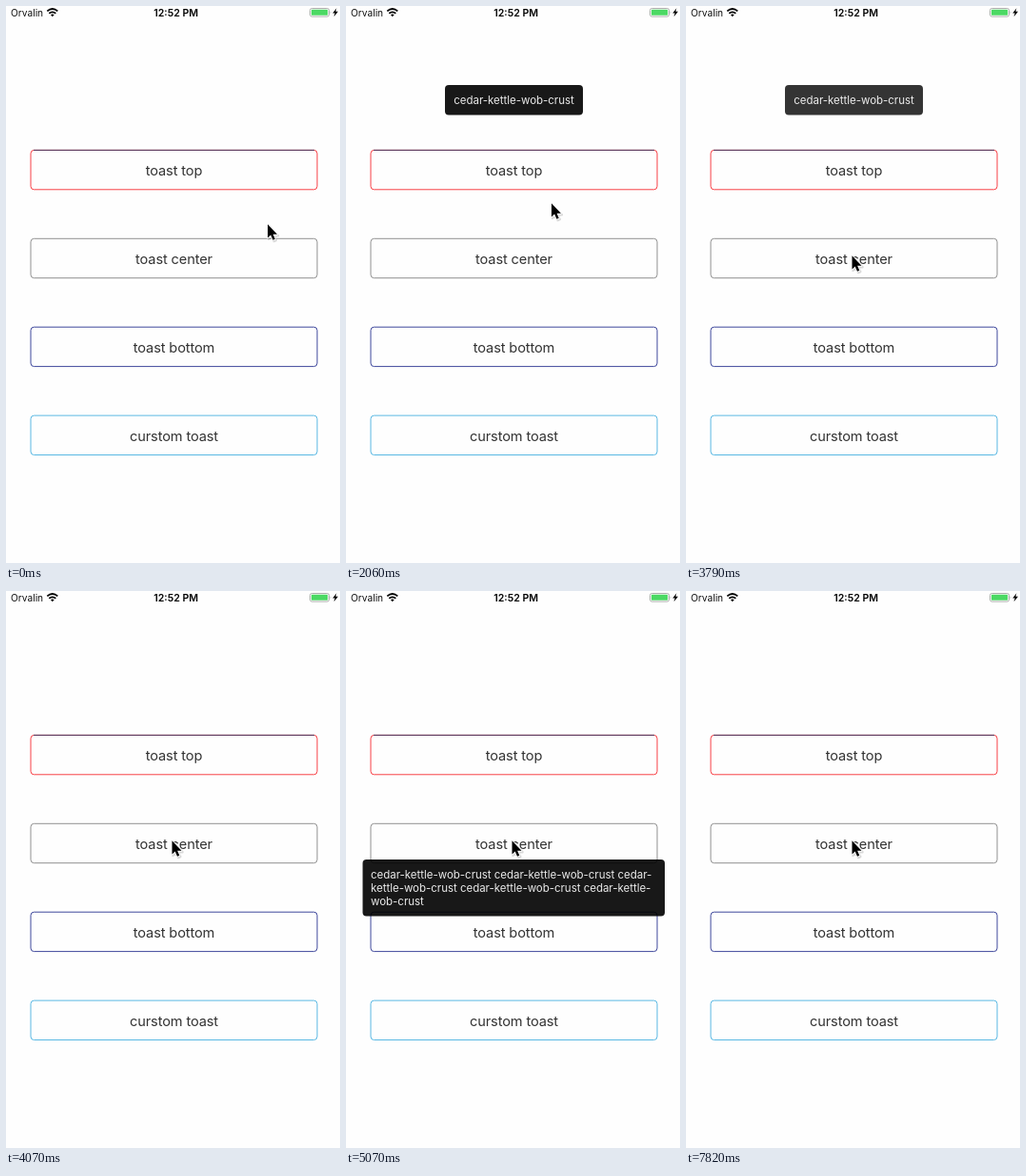
Recreate the animation shown at these times as an HTML page. Size 351 by 585 pixels, loop 8 s.

```html
<!DOCTYPE html>
<html lang="en">
<head>
<meta charset="utf-8">
<title>Toast demo</title>
<style>
  html, body { margin: 0; width: 100%; height: 100%; overflow: hidden; background: #fefefe; }
  svg { display: block; width: 100%; height: 100%; }
  text { font-family: Inter, Roboto, "Liberation Sans", sans-serif; }
  .label { font-size: 14.6px; letter-spacing: -0.13px; fill: #333; text-anchor: middle; }
  .toast text { font-size: 11.5px; letter-spacing: -0.02px; fill: #e8e8e8; }
  .status { font-size: 10.2px; fill: #111; }
  .clock { font-size: 10.6px; font-weight: 600; fill: #000; text-anchor: middle; }
</style>
</head>
<body>
<svg viewBox="0 0 351 585">
  <rect width="351" height="585" fill="#fefefe"/>

  <text class="status" x="5" y="10.7">Orvalin</text>
  <g fill="none" stroke="#000" stroke-width="1.8">
    <path d="M43.3 5.4Q48.8 .7 54.3 5.4"/>
    <path d="M45.3 7.8Q48.8 4.9 52.3 7.8"/>
  </g>
  <path d="M47 9.2Q48.8 7.8 50.6 9.2L48.8 11.2Z"/>
  <text class="clock" x="178.7" y="10.8">12:52 PM</text>
  <rect x="319.5" y="2.5" width="20" height="8.6" rx="2" fill="none" stroke="#a5a5a5" stroke-width=".9"/>
  <rect x="320.9" y="3.8" width="17.2" height="6" rx=".9" fill="#4cd964"/>
  <path d="M340.7 5.2Q342.1 6.8 340.7 8.4Z" fill="#a5a5a5"/>
  <path d="M347.4 2.2L343.3 7.4H345.7L344.6 11.2L349 5.8H346.4Z"/>

  <g id="buttons"></g>

  <g class="toast" id="topToast">
    <rect x="104" y="83" width="145" height="31.5" rx="4"/>
  </g>
  <g class="toast" id="longToast">
    <rect x="17.5" y="282" width="317.5" height="59.5" rx="4"/>
  </g>

  <g id="cursor">
    <path d="M0 0V14.2L3.2 11.3L5.5 16.4L7.8 15.4L5.6 10.5H10Z" transform="translate(1 1.4)"
          fill="#000" stroke="#000" stroke-width="2.4" stroke-linejoin="round" opacity=".14"/>
    <path d="M0 0V14.2L3.2 11.3L5.5 16.4L7.8 15.4L5.6 10.5H10Z"
          fill="#000" stroke="#fff" stroke-width="1.8" stroke-linejoin="round" paint-order="stroke"/>
  </g>
</svg>

<script>
const LOOP = 8000;
const byId = id => document.getElementById(id);

function add(parent, tag, attrs, content = "") {
  const node = document.createElementNS("http://www.w3.org/2000/svg", tag);
  for (const key in attrs) node.setAttribute(key, attrs[key]);
  node.textContent = content;
  parent.append(node);
  return node;
}

const buttons = [
  ["toast top", "#f8353a"],
  ["toast center", "#8a8a8a"],
  ["toast bottom", "#333c96"],
  ["curstom toast", "#4fb4e2"]
].map(([name, color], i) => {
  const y = 151.4 + i * 92.9;
  const group = add(byId("buttons"), "g", {});
  const box = { x: 26, y, width: 301, height: 41.4, rx: 3.5 };
  add(group, "rect", { ...box, fill: "none", stroke: color, "stroke-width": .94 });
  if (i === 0) add(group, "path", { d: `M29 ${y}H324`, stroke: "#403760", "stroke-width": .94 });
  const shade = add(group, "rect", {
    x: 26.5, y: y + .5, width: 300, height: 40.4, rx: 3, fill: "#eee", opacity: 0
  });
  const label = add(group, "text", { class: "label", x: 176.5, y: y + 26.8 }, name);
  return { shade, label };
});

const note = "cedar-kettle-wob-crust";
add(byId("topToast"), "text", { x: 176.5, y: 103, "text-anchor": "middle" }, note);
[
  `${note} ${note} cedar-`,
  `kettle-wob-crust ${note} cedar-kettle-`,
  "wob-crust"
].forEach((line, i) => add(byId("longToast"), "text", { x: 26, y: 301.8 + i * 14.3 }, line));

// Progress in n even steps; the first step lands on `first`.
// The small lead absorbs step times rounded to 10 ms.
function stepped(t, start, end, n, first = 1 / n) {
  if (t < start) return 0;
  const k = Math.min(n - 1, Math.floor((t - start) * (n - 1) / (end - start) + .1));
  return first + (1 - first) * k / (n - 1);
}

const moves = [
  { time: [60, 410, 7], by: [-28, -54], bend: 1 },
  { time: [1770, 2530, 14], by: [-72.5, 87], bend: 1.18 }
];

const toasts = [
  { id: "topToast", show: [1070, 1300, 5, .22], hide: [3790, 4070, 6, .12] },
  { id: "longToast", show: [4790, 5070, 6, .25], hide: [7590, 7820, 5, .23] }
];

function press(button, on) {
  button.shade.setAttribute("opacity", on ? 1 : 0);
  button.label.setAttribute("opacity", on ? .65 : 1);
}

function draw(t) {
  let x = 275, y = 229.3;
  for (const { time, by, bend } of moves) {
    const p = stepped(t, ...time);
    x += by[0] * p;
    y += by[1] * p ** bend;
  }
  byId("cursor").setAttribute("transform", `translate(${x} ${y})`);

  toasts.forEach(({ id, show, hide }, i) => {
    const alpha = stepped(t, ...show) - stepped(t, ...hide);
    byId(id).setAttribute("opacity", .9 * alpha);
    press(buttons[i], t >= show[0] && t < show[0] + 165);
  });
}

const begin = performance.now();
function tick() {
  draw((performance.now() - begin) % LOOP);
  requestAnimationFrame(tick);
}
tick();
</script>
</body>
</html>
```
